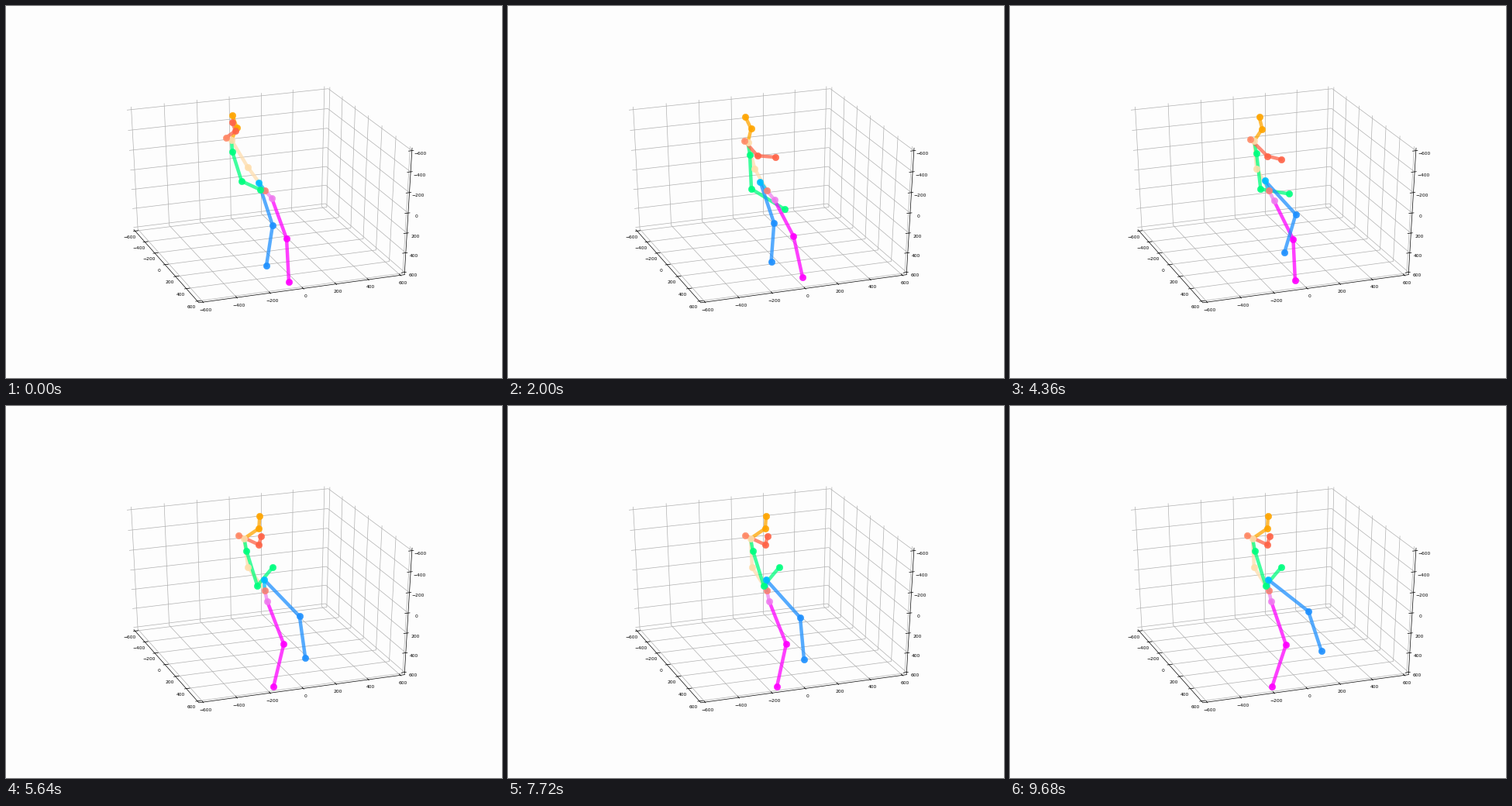
Write a matplotlib script that moves like this. It is 640 px wide and 480 px high and loops after 9720 ms.

```python
import numpy as np
import matplotlib.pyplot as plt
from matplotlib.animation import FuncAnimation

W, H, DPI = 640, 480, 100
FRAMES, STEP = 243, 40
EDGE = 25 / 48          # half side of the box, 600 units plus a margin
TICKS = range(-600, 601, 200)
THIN = 0.5

fig = plt.figure(figsize=(W / DPI, H / DPI), dpi=DPI, facecolor="#fdfdfd")
ax = fig.add_axes([0, 0, 1, 1])
ax.set_xlim(0, W)
ax.set_ylim(H, 0)
ax.axis("off")

# Camera
AZIM, ELEV, DIST = np.radians(-110), np.radians(30), 10
CENTER, SCALE = (335, 238.7), (2681, 1778)
ca, sa, ce, se = np.cos(AZIM), np.sin(AZIM), np.cos(ELEV), np.sin(ELEV)
RIGHT = np.array([-sa, ca, 0])
UP = np.array([-ca * se, -sa * se, ce])
TOWARD = np.array([ca * ce, sa * ce, se])


def project(p):
    depth = DIST - TOWARD @ p
    return (CENTER[0] + SCALE[0] * (RIGHT @ p) / depth,
            CENTER[1] - SCALE[1] * (UP @ p) / depth)


def line3d(points, color, z):
    xs, ys = zip(*(project(np.array(p)) for p in points))
    ax.plot(xs, ys, color=color, lw=THIN, zorder=z)


def label(point, value):
    x, y = project(np.array(point))
    ax.text(x, y + 2.5, str(value).replace("-", "\u2212"), fontsize=4.3,
            family="DejaVu Sans", ha="center", va="center", zorder=4)


def draw_box():
    e, out = EDGE, EDGE + 0.03
    tip, root = e + 1 / 120, e - 1 / 60
    for v in TICKS:
        u = v / 1200
        for grid in ([(u, -e, -e), (u, e, -e), (u, e, e)],
                     [(-e, -u, -e), (e, -u, -e), (e, -u, e)],
                     [(-e, e, -u), (e, e, -u), (e, -e, -u)]):
            line3d(grid, "#b0b0b0", 1)
        for tick in ([(u, -tip, -e), (u, -root, -e)],
                     [(-tip, -u, -e), (-root, -u, -e)],
                     [(tip, -e, -u), (root, -e, -u)]):
            line3d(tick, "black", 2)
        for spot in ((u, -out, -out), (-out, -u, -out), (out, -out, -u)):
            label(spot, v)
    line3d([(-e, e, -e), (-e, -e, -e), (e, -e, -e)], "black", 2)
    line3d([(e, -e, -e), (e, -e, e)], "black", 2)


def ease(t, start, end):
    s = np.clip((t - start) / (end - start), 0, 1)
    return s * s * (3 - 2 * s)


def bump(t, mid, half):
    return np.cos(np.clip((t - mid) / half, -1, 1) * np.pi / 2) ** 2


# Each joint: parent, colour, offset from the parent (x + y*1j, in pixels)
# when standing, when reaching forward and when stepping out
PELVIS = 334 + 238j
JOINTS = {
    "spine": ("pelvis", "navajowhite", -22 - 30j, -13 - 27j, -19 - 30j),
    "thorax": ("spine", "navajowhite", -21 - 35j, -4 - 34j, -2 - 37j),
    "neck": ("thorax", "orange", 7 - 16j, 3 - 18j, 19 - 13j),
    "head": ("neck", "orange", -6 - 16j, -8 - 15j, 1 - 16j),
    "l_shoulder": ("thorax", "springgreen", 1 + 15j, 3 + 16j, 3 + 16j),
    "l_elbow": ("l_shoulder", "springgreen", 12 + 38j, -2 + 47j, 14 + 45j),
    "l_wrist": ("l_elbow", "springgreen", 24 + 11j, 50 + 32j, 20 - 24j),
    "r_shoulder": ("thorax", "#ff8c69", -7 - 3j, -3 - 1j, -7 - 4j),
    "r_elbow": ("r_shoulder", "tomato", 12 - 9j, 18 + 30j, 26 + 12j),
    "r_wrist": ("r_elbow", "tomato", -4 - 11j, 31 + 18j, 3 - 11j),
    "r_hip": ("pelvis", "violet", 9 + 10j, 10 + 13j, 3 + 14j),
    "r_knee": ("r_hip", "magenta", 19 + 52j, 27 + 45j, 22 + 55j),
    "r_ankle": ("r_knee", "magenta", 3 + 56j, 15 + 51j, -12 + 55j),
    "l_hip": ("pelvis", "deepskyblue", -8 - 10j, -9 - 12j, -1 - 14j),
    "l_knee": ("l_hip", "dodgerblue", 18 + 55j, 18 + 53j, 44 + 49j),
    "l_ankle": ("l_knee", "dodgerblue", -8 + 52j, -2 + 49j, 5 + 54j),
}

time = np.arange(FRAMES) * STEP
phase = ease(time, 900, 2600) + ease(time, 3600, 5200)
rise = bump(time, 500, 480)
lift = bump(time, 2000, 700)
swing = bump(time, 4360, 640)
sway = bump(time, 5200, 900)
spread = ease(time, 9000, 9680) + 0.4 * sway

# Turns in degrees and shifts in pixels on top of the blended offsets
TURNS = {"r_wrist": -20 * lift,
         "l_knee": -12 * swing - 10 * spread,
         "l_ankle": 18 * swing - 13 * spread,
         "r_knee": 3 * spread, "r_ankle": 6 * spread}
SHIFTS = {"spine": -5 * sway, "thorax": -6 * sway - (3 + 4j) * rise}


def build_paths():
    paths = {"pelvis": np.full(FRAMES, PELVIS)}
    for name, (parent, _, *keys) in JOINTS.items():
        offset = np.interp(phase, range(3), keys) + SHIFTS.get(name, 0)
        turn = np.exp(1j * np.radians(TURNS.get(name, 0)))
        paths[name] = paths[parent] + offset * turn
    return paths


draw_box()
paths = build_paths()
bones = {name: ax.plot([], [], color=color, lw=3.2, alpha=0.75, zorder=5)[0]
         for name, (_, color, *_) in JOINTS.items()}
dots = {name: ax.plot([], [], "o", color=JOINTS[name][1] if name in JOINTS
                      else "salmon", ms=6, mew=0.4, alpha=0.9, zorder=6)[0]
        for name in paths}


def update(i):
    for name, bone in bones.items():
        ends = np.array([paths[JOINTS[name][0]][i], paths[name][i]])
        bone.set_data(ends.real, ends.imag)
    for name, dot in dots.items():
        p = paths[name][i]
        dot.set_data([p.real], [p.imag])
    return [*bones.values(), *dots.values()]


anim = FuncAnimation(fig, update, frames=FRAMES, interval=STEP, repeat=True,
                     repeat_delay=0, blit=False)
plt.show()
```
